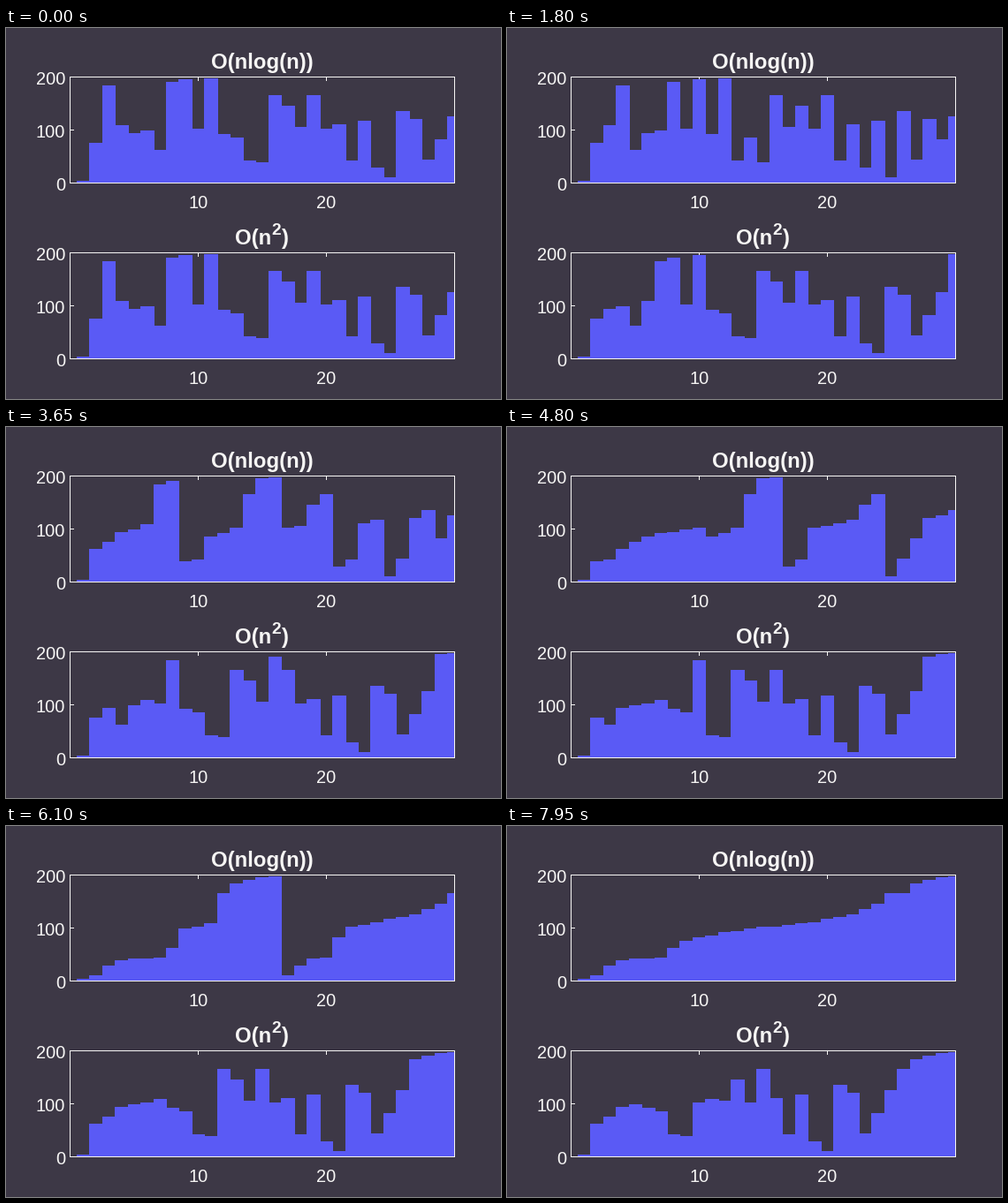
Write a matplotlib script that moves like this. It is 560x420 px and loops after 8 s.

```python
import matplotlib.pyplot as plt
from matplotlib.animation import FuncAnimation
from matplotlib.patches import Rectangle

W, H, DPI = 560, 420, 100
FRAMES, INTERVAL = 160, 50
BG, BAR, INK = "#3d3846", "#5a5af5", "#f6f5f4"
LEFT, RIGHT = 72, 507
SPAN = 120  # pixel height of a plot, for values 0 to 200

DATA = [3, 75, 184, 108, 93, 98, 62, 190, 195, 102,
        197, 92, 85, 42, 39, 165, 145, 105, 165, 102,
        110, 42, 117, 28, 10, 135, 120, 43, 82, 125]
N = len(DATA)


def merge_sort(values):
    """Bottom-up merge sort: one step per comparison, one per tail copy."""
    a = list(values)
    yield a[:]
    width = 1
    while width < N:
        for lo in range(0, N, 2 * width):
            mid, hi = min(lo + width, N), min(lo + 2 * width, N)
            left, right = a[lo:mid], a[mid:hi]
            k = lo
            while left and right:
                a[k] = (left if left[0] <= right[0] else right).pop(0)
                k += 1
                yield a[:]
            a[k:hi] = left + right
            yield a[:]
        width *= 2


def bubble_sort(values):
    """Bubble sort with full passes: one step per comparison."""
    a = list(values)
    yield a[:]
    for _ in range(N - 1):
        for i in range(N - 1):
            if a[i] > a[i + 1]:
                a[i], a[i + 1] = a[i + 1], a[i]
            yield a[:]


def steps(sorter):
    states = list(sorter(DATA))[:FRAMES]
    return states + [states[-1]] * (FRAMES - len(states))


def col(x):
    return round(72.47 + 434 / 30 * x)


fig = plt.figure(figsize=(W / 100, H / 100), dpi=DPI, facecolor=BG)
ax = fig.add_axes([0, 0, 1, 1])
ax.set_xlim(0, W)
ax.set_ylim(H, 0)
ax.axis("off")


def rect(x, y, w, h, color, z):
    return ax.add_patch(Rectangle((x, y), w, h, facecolor=color, linewidth=0,
                                  antialiased=False, zorder=z))


def label(x, y, text, size=20, ha="center", weight="normal"):
    ax.text(x, y, text, color=INK, family="Liberation Sans", weight=weight,
            fontsize=size * 72 / DPI, ha=ha, va="baseline", zorder=4)


class Plot:
    def __init__(self, base, sorter):
        self.base = base
        self.states = steps(sorter)
        self.bars = []
        for i in range(1, N + 1):
            x0, x1 = col(i - 0.5), min(col(i + 0.5) + 1, RIGHT)
            self.bars.append(rect(x0, base, x1 - x0, 0, BAR, 2))
        self.frame()

    def frame(self):
        base, top = self.base, self.base - SPAN
        for y in (top, base):
            rect(LEFT, y, RIGHT - LEFT + 1, 1, INK, 3)
        for x in (LEFT, RIGHT):
            rect(x, top, 1, SPAN + 1, INK, 3)
        for v in (10, 20):
            x = col(v)
            rect(x, top, 1, 5, INK, 1)
            rect(x, base - 4, 1, 5, INK, 1)
            label(x + 0.5, base + 29, str(v))
        for v in (0, 100, 200):
            y = base - v * SPAN // 200
            rect(LEFT, y, 5, 1, INK, 1)
            rect(RIGHT - 4, y, 5, 1, INK, 1)
            label(67, y + 9, str(v), ha="right")

    def show(self, i):
        for bar, v in zip(self.bars, self.states[i]):
            top = round(self.base + 0.2 - v * SPAN / 200)
            bar.set_y(top)
            bar.set_height(self.base + 1 - top)


plots = [Plot(175, merge_sort), Plot(374, bubble_sort)]

label(290, 46, "O(nlog(n))", 24, weight="bold")
for x, y, text, size in ((259, 245, "O(n", 24), (300.5, 234, "2", 19.2),
                         (311.5, 245, ")", 24)):
    label(x, y, text, size, "left", "bold")


def update(i):
    for plot in plots:
        plot.show(i)
    return [bar for plot in plots for bar in plot.bars]


anim = FuncAnimation(fig, update, frames=FRAMES, interval=INTERVAL,
                     init_func=lambda: update(0), repeat=True,
                     repeat_delay=0, blit=False)
plt.show()
```
